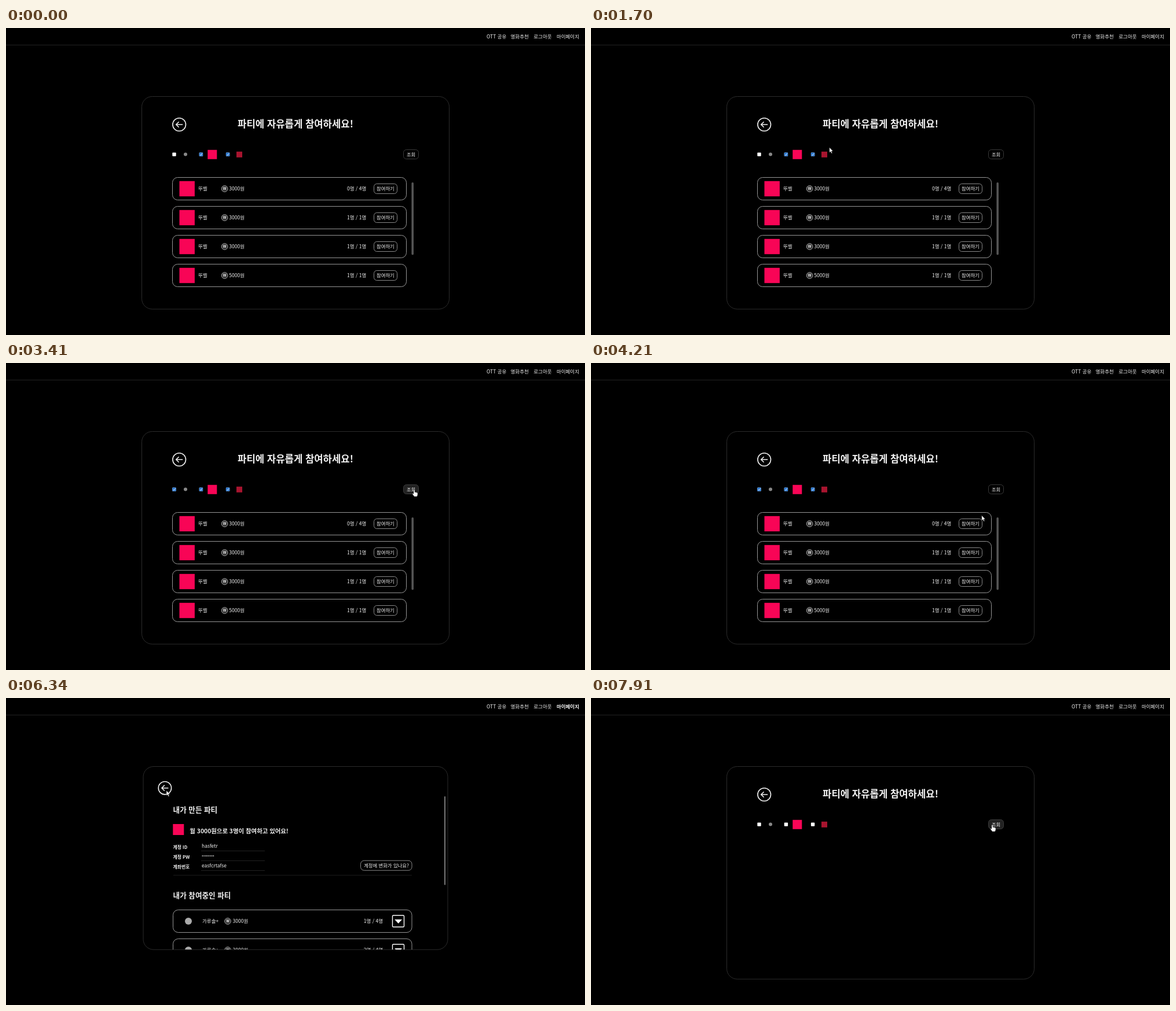
An HTML page that plays this animation: 1000 by 531 pixels, repeating every 8 s.

```html
<!DOCTYPE html>
<html lang="ko">
<head>
<meta charset="utf-8">
<style>
  html, body { margin: 0; width: 100%; height: 100%; overflow: hidden; background: #000; }
  svg { display: block; width: 100%; height: 100%; }
  text { fill: #f2f2f2; font-family: "Noto Sans CJK KR", "Noto Sans CJK", "Noto Sans", sans-serif; white-space: pre; }
  .line { fill: none; stroke: #f2f2f2; }
</style>
</head>
<body>
<svg id="stage" viewBox="0 0 1000 531"></svg>
<script>
const LOOP = 8000;
const PINK = '#f80556';

const text = (x, y, content, size = 8.5, weight = 400, extra = '') =>
  `<text x="${x}" y="${y}" font-size="${size}" font-weight="${weight}" ${extra}>${content}</text>`;
const box = (x, y, w, h, r, stroke, extra = '') =>
  `<rect x="${x}" y="${y}" width="${w}" height="${h}" rx="${r}" fill="none" stroke="${stroke}" stroke-width=".9" ${extra}/>`;
const fillBox = (x, y, w, h, color, r = 0, extra = '') =>
  `<rect x="${x}" y="${y}" width="${w}" height="${h}" rx="${r}" fill="${color}" ${extra}/>`;
const dot = (x, y, r, color) => `<circle cx="${x}" cy="${y}" r="${r}" fill="${color}"/>`;
const group = (id, content, extra = '') => `<g id="${id}" ${extra}>${content}</g>`;

const backButton = (x, y, r) => `<g transform="translate(${x} ${y})" class="line" stroke-width="1.6">
  <circle r="${r}"/><path d="M6 0H-5M-.6-4.8L-5.4 0L-.6 4.8"/></g>`;

const coin = (x, y) => `<circle cx="${x}" cy="${y}" r="5.4" fill="#333" stroke="#bbb" stroke-width=".8"/>` +
  text(x, y + 2.2, 'W', 6.2, 900, 'text-anchor="middle"');

const checkbox = (id, x) => fillBox(x, 215.4, 6.4, 6.4, '#fff', 1) +
  group(id, fillBox(x, 215.4, 6.4, 6.4, '#2878d4', 1) +
    `<path class="line" d="M${x + 1.4} 218.8l1.4 1.4l2.4-3.2"/>`);

const partyRow = (price, people, i) => {
  const y = 258.5 + i * 50, mid = y + 19.5;
  return box(287.5, y, 404, 39, 9, '#a8a8a8') + fillBox(299.5, mid - 13.2, 26.4, 26.4, PINK) +
    text(332, mid + 3.2, '뚜벨') + coin(377.6, mid) + text(385.3, mid + 3.2, price + '원') +
    text(622.3, mid + 3.2, people, 8.5, 400, 'text-anchor="end"') +
    box(635.5, mid - 8.5, 40, 17, 5, '#999') + text(640, mid + 3.2, '참여하기', 8.4);
};

const joinedRow = (y, people, peopleX, hasToggle) => {
  const mid = y + 19.5;
  return box(288.5, y, 412.5, 39, 9, '#a8a8a8') + dot(315, mid, 6, '#aaa') +
    text(339, mid + 3.2, '가루솔+') + coin(383, mid) + text(391.6, mid + 3.2, '3000원') +
    text(peopleX, mid + 3.2, people, 8.5, 400, 'text-anchor="end"') +
    (hasToggle ? box(667.5, mid - 10, 20, 20, 1.5, '#fff', 'style="stroke-width:1.4"') +
      `<path fill="#fff" d="M671.2 ${mid - 3}h12.8l-6.4 7z"/>` : '');
};

const field = (y, label, value, size = 8.5, extra = '') => text(288.6, y + 3, label, 7.8, 700) +
  text(338, y + .6, value, size, 400, extra) + fillBox(337, y + 6, 110, .8, '#2a2a2a');

const navigation = fillBox(0, 29, 1000, 1, '#222') +
  text(830, 18.2, 'OTT 공유') + text(871.5, 18.2, '영화추천') + text(911.3, 18.2, '로그아웃') +
  text(990, 18.2, '마이페이지', 8.5, 400, 'id="myPageLink" text-anchor="end"');

const listPage = box(234.5, 118.5, 531, 367.7, 18, '#303030') + backButton(299.2, 167, 11.3) +
  text(500, 171.6, '파티에 자유롭게 참여하세요!', 16.7, 700, 'text-anchor="middle"') +
  checkbox('check0', 287.3) + dot(310, 218.6, 3, '#888') +
  checkbox('check1', 333.7) + fillBox(348.3, 210.8, 16, 16, PINK) +
  checkbox('check2', 379.9) + fillBox(398, 213.8, 10, 10, '#a8142f') +
  box(686.5, 210.5, 26, 16, 5, '#404040', 'id="search"') + text(691.9, 222, '조회', 8.4) +
  group('parties', [['3000', '0명 / 4명'], ['3000', '1명 / 1명'], ['3000', '1명 / 1명'], ['5000', '1명 / 1명']]
    .map(([price, people], i) => partyRow(price, people, i)).join('') +
    fillBox(700.4, 267, 3.6, 125.5, '#555', 1.8));

const myPage = '<clipPath id="panelClip"><rect x="237" y="118" width="527" height="317"/></clipPath>' +
  box(237, 118.5, 526, 316.7, 18, '#303030') + backButton(274.4, 155.7, 11.2) +
  text(288.6, 197.7, '내가 만든 파티', 12.6, 700) + fillBox(288.3, 218, 19, 19, PINK) +
  text(317.3, 234.3, '월 3000원으로 3명이 참여하고 있어요!', 10.4, 700) +
  field(258, '계정 ID', 'hasfetr') +
  field(275, '계정 PW', '••••••••', 7.2, 'style="font-family:\'Noto Sans\',sans-serif"') +
  field(292, '계좌번호', 'easfcrtafse') +
  box(612.5, 281.2, 88.5, 17, 6, '#999') + text(618, 292.8, '계정에 변화가 있나요?', 8.4) +
  fillBox(289, 306, 412, .8, '#222') + text(288.6, 345.8, '내가 참여중인 파티', 12.6, 700) +
  group('firstLoad', joinedRow(366.5, '1명 / 4명', 672, false)) +
  group('fullLoad', joinedRow(366.5, '1명 / 4명', 651, true) + joinedRow(416.5, '2명 / 4명', 651, true),
    'clip-path="url(#panelClip)"') +
  fillBox(757, 170, 2, 192, '#777', 1, 'id="scrollThumb"');

const arrow = '<path fill="#fff" stroke="#000" stroke-width=".5" d="M0 0V9L2 7.2L3.5 10.4L5 9.7L3.5 6.6H6.3Z"/>';
const hand = `<path fill="#fff" stroke="#000" stroke-width=".4" d="M-1 .3Q0-.9 1 .3V4Q2 3.3 2.8 4.2
  Q4 3.7 4.5 4.7Q5.8 4.5 6 5.8V8Q5.8 10 4.8 11.5H0L-3.2 7Q-3 5.6-1.8 6.3L-1 7Z"/>`;

document.getElementById('stage').innerHTML = navigation + group('listPage', listPage) + group('myPage', myPage) +
  group('cursor', group('arrow', arrow) + group('hand', hand));

const el = id => document.getElementById(id);
const show = (id, visible) => el(id).setAttribute('display', visible ? 'inline' : 'none');

// Cursor stops: time, x, y
const stops = [
  [880, 640, 214], [1060, 563, 188], [1210, 520, 184], [1350, 520, 184], [2020, 318, 226], [2170, 318, 226],
  [2440, 295.6, 220], [2520, 291, 219], [2780, 291, 219], [3410, 705, 219.5], [3850, 705, 219.5],
  [4410, 662.5, 281.5], [5310, 662.5, 281.5], [6010, 276, 163], [6170, 277, 160], [6650, 277, 160],
  [7070, 560, 230], [7290, 560, 230], [7910, 693, 219.5], [8000, 693, 219.5]
];

function cursorAt(t) {
  const next = stops.findIndex(stop => stop[0] > t);
  if (next < 1) return stops[0].slice(1);
  const [t0, x0, y0] = stops[next - 1], [t1, x1, y1] = stops[next];
  const p = (t - t0) / (t1 - t0), ease = p * p * (3 - 2 * p);
  return [x0 + (x1 - x0) * ease, y0 + (y1 - y0) * ease];
}

function draw(t) {
  const onMyPage = t >= 4820 && t < 6570;
  const returned = t >= 6570;
  const [x, y] = cursorAt(t);
  const over = (left, top, w, h) => x > left && x < left + w && y > top && y < top + h;
  const overSearch = !onMyPage && over(686, 210, 27, 17);
  const overJoin = !onMyPage && !returned && over(635, 269, 41, 17);
  const overEdit = onMyPage && over(612, 281, 89, 17);
  const pointing = overSearch || overJoin || overEdit;

  show('listPage', !onMyPage);
  show('myPage', onMyPage);
  show('parties', !returned);
  show('check0', t >= 2640 && !returned);
  show('check1', !returned);
  show('check2', !returned);
  show('firstLoad', t < 4900);
  show('fullLoad', t >= 4900);
  el('scrollThumb').setAttribute('height', t < 4900 ? 192 : 153.5);
  el('myPageLink').setAttribute('font-weight', onMyPage ? 700 : 400);
  el('search').setAttribute('fill', overSearch ? '#222' : 'none');

  show('cursor', t >= 880);
  show('arrow', !pointing);
  show('hand', pointing);
  el('cursor').setAttribute('transform', `translate(${x} ${y})`);
}

const start = performance.now();
function tick() {
  draw((performance.now() - start) % LOOP);
  requestAnimationFrame(tick);
}
tick();
</script>
</body>
</html>
```
